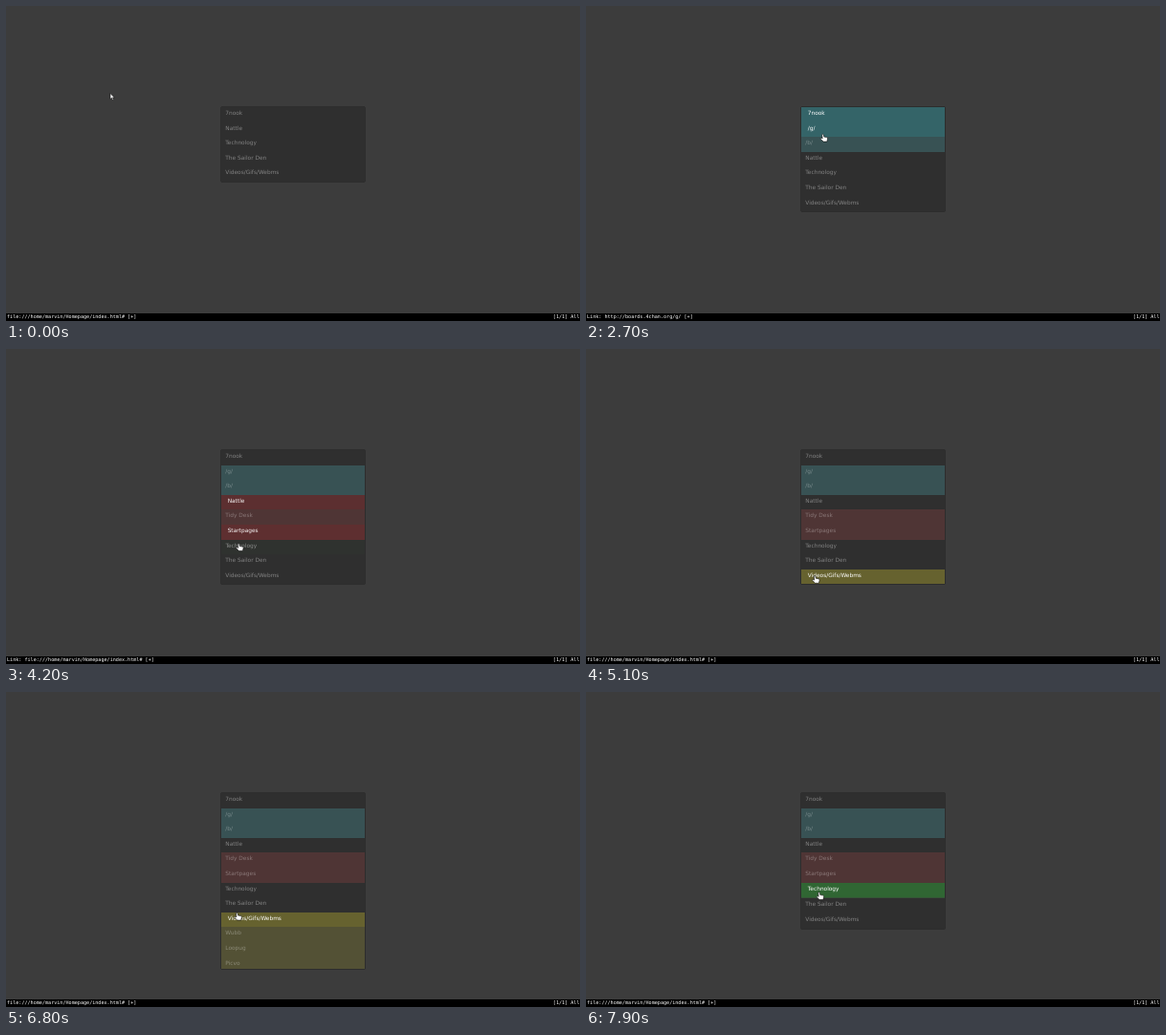
Write an HTML page that moves like this. It is 600x330 px and loops after 8 s.

```html
<!DOCTYPE html>
<html lang="en">
<head>
<meta charset="utf-8">
<title>Start page menu</title>
<style>
html, body { margin: 0; width: 100%; height: 100%; overflow: hidden; background: #3c3c3c; text-rendering: geometricPrecision; }
#menu {
  position: absolute; left: 224px; top: 105px; width: 150px;
  border: 1px solid #2d2d2d; border-radius: 2px; background: #2f2f2f;
  font: 5.85px/15.6px "DejaVu Sans", sans-serif;
}
.row { position: relative; height: 15.6px; white-space: nowrap; }
.row span { position: absolute; top: 0; }
.sub { overflow: hidden; }
#bar {
  position: absolute; left: 0; top: 322px; width: 600px; height: 8px; background: #000; color: #fff;
  font: 5.12px/8px "DejaVu Sans Mono", monospace; white-space: pre;
}
#bar span { position: absolute; left: 1px; }
#bar span + span { left: auto; right: .5px; }
svg { position: absolute; left: 0; top: 0; width: 600px; height: 330px; }
svg path { fill: #fff; stroke: #111; stroke-width: .6; stroke-linejoin: round; }
</style>
</head>
<body>
<div id="menu"></div>
<div id="bar"><span id="status"></span><span>[1/1] All</span></div>
<svg viewBox="0 0 600 330">
  <g id="cursor">
    <path id="arrow" d="M0 0V6L1.4 4.8 2.4 7 3.5 6.5 2.5 4.4H4.3Z"/>
    <path id="hand" d="M-.8 .3Q0-.6 .9 .3L1.3 2.6 4.2 3.1Q5.3 3.4 5.1 4.6L4.4 7.6H.6L-2.4 4.7Q-2.5 3.6 -1.3 3.8L-.3 4.4Z"/>
  </g>
</svg>
<script>
const LOOP = 8000, STEP = 100, TICK = 10, ROW = 15.6, TOP = 106, SLIDE = 400, FADE = 250;
const PAGE = "file:///home/marvin/Homepage/index.html#";
const $ = id => document.getElementById(id);
const clamp = k => Math.min(1, Math.max(0, k));
const mix = (a, b, k) => a + (b - a) * k;
const blend = (color, base, k) => `color-mix(in srgb, ${color} ${k * 100}%, ${base})`;
const smooth = k => k * k * k * (k * (6 * k - 15) + 10);
const swing = k => .5 - Math.cos(Math.PI * clamp(k)) / 2;

// Clicks alternately open and close a group
const groups = [
  { name: "7nook", color: "#346468", clicks: [1900], site: "http://boards.4chan.org", subs: ["/g/", "/b/"] },
  { name: "Nattle", color: "#5f2f30", clicks: [3300], site: "http://nattle.example/", subs: ["Tidy Desk", "Startpages"] },
  { name: "Technology", color: "#306633", clicks: [7858], site: "http://tech.example/", subs: ["News", "Reviews", "Guides"] },
  { name: "The Sailor Den", color: "#5a3c64", clicks: [], subs: [] },
  { name: "Videos/Gifs/Webms", color: "#66622f", clicks: [5100, 6730], site: "http://clips.example/", subs: ["Wubb", "Loopug", "Picvo"] }
];

// Pointer stops: time, x, y
const stops = [
  [0, 109, 91.5], [200, 109, 91.5], [700, 172, 81], [1550, 238, 106], [2300, 244, 118],
  [2700, 247.5, 134.5], [3200, 243, 154], [3550, 243, 162], [3850, 243, 183], [4150, 243, 199],
  [4200, 243, 204], [4900, 239, 237], [5500, 239, 239], [6100, 241, 282], [6700, 241, 232],
  [7100, 242, 230], [7700, 243.5, 210], [LOOP, 243.5, 210]
];

function pointer(t) {
  const i = stops.findIndex(s => s[0] > t), a = stops[i - 1], b = stops[i];
  const k = (t - a[0]) / (b[0] - a[0]);
  return [mix(a[1], b[1], k), mix(a[2], b[2], k)];
}

const subHeight = (g, t) => g.items.length * ROW *
  g.clicks.reduce((open, click, i) => open + (-1) ** i * swing((t - click) / SLIDE), 0);

function addDiv(parent, className) {
  const el = document.createElement("div");
  el.className = className;
  parent.append(el);
  return el;
}

function addRow(parent, group, label, rest, faint, url) {
  const el = addDiv(parent, "row"), text = document.createElement("span");
  text.textContent = label;
  el.append(text);
  return { el, text, group, rest, faint, url, heat: 0 };
}

for (const g of groups) {
  const dim = blend(g.color, "#3c3c3c", .55);
  g.head = addRow($("menu"), g, g.name, "#2f2f2f", .4, PAGE);
  g.box = addDiv($("menu"), "sub");
  g.items = g.subs.map(s => addRow(g.box, g, s, dim, .33, g.site + s.toLowerCase().replace(" ", "")));
}
const rows = groups.flatMap(g => [g.head, ...g.items]);

function rowAt(y, t) {
  let top = TOP;
  if (y < top) return null;
  for (const g of groups) {
    if (y < top + ROW) return g.head;
    top += ROW;
    const height = subHeight(g, t);
    if (y < top + height) return g.items[Math.floor((y - top) / ROW)];
    top += height;
  }
  return null;
}

// Replays hovering from the loop start, so the result depends on t only
function hoverAt(end) {
  let over = null, clicked = false;
  rows.forEach(r => r.heat = 0);
  for (let t = 0; t <= end; t += TICK) {
    const now = rowAt(pointer(t)[1], t);
    const pressed = now && now.group.clicks.some(c => c <= t && c > t - TICK);
    clicked = pressed || clicked && now === over;
    over = now;
    for (const r of rows) {
      const lit = over && (r === over || r === over.group.head);
      r.heat = clamp(r.heat + (lit ? TICK : -TICK) / FADE);
    }
  }
  return { over, clicked };
}

function draw(t) {
  const { over, clicked } = hoverAt(t);
  for (const r of rows) {
    const k = smooth(r.heat);
    r.el.style.background = blend(r.group.color, r.rest, k);
    r.text.style.color = `rgba(255,255,255,${mix(r.faint, 1, k)})`;
    r.text.style.left = mix(4.3, 6.8, k) + "px";
  }
  for (const g of groups) g.box.style.height = subHeight(g, t) + "px";
  $("status").textContent = (over && !clicked ? "Link: " + over.url : PAGE) + " [+]";
  $("cursor").setAttribute("transform", `translate(${pointer(t)})`);
  $("arrow").style.display = over ? "none" : "";
  $("hand").style.display = over ? "" : "none";
}

const start = performance.now();
let last = -1;
function frame() {
  const t = Math.floor((performance.now() - start) % LOOP / STEP) * STEP;
  if (t !== last) draw(last = t);
  requestAnimationFrame(frame);
}
frame();
</script>
</body>
</html>
```
